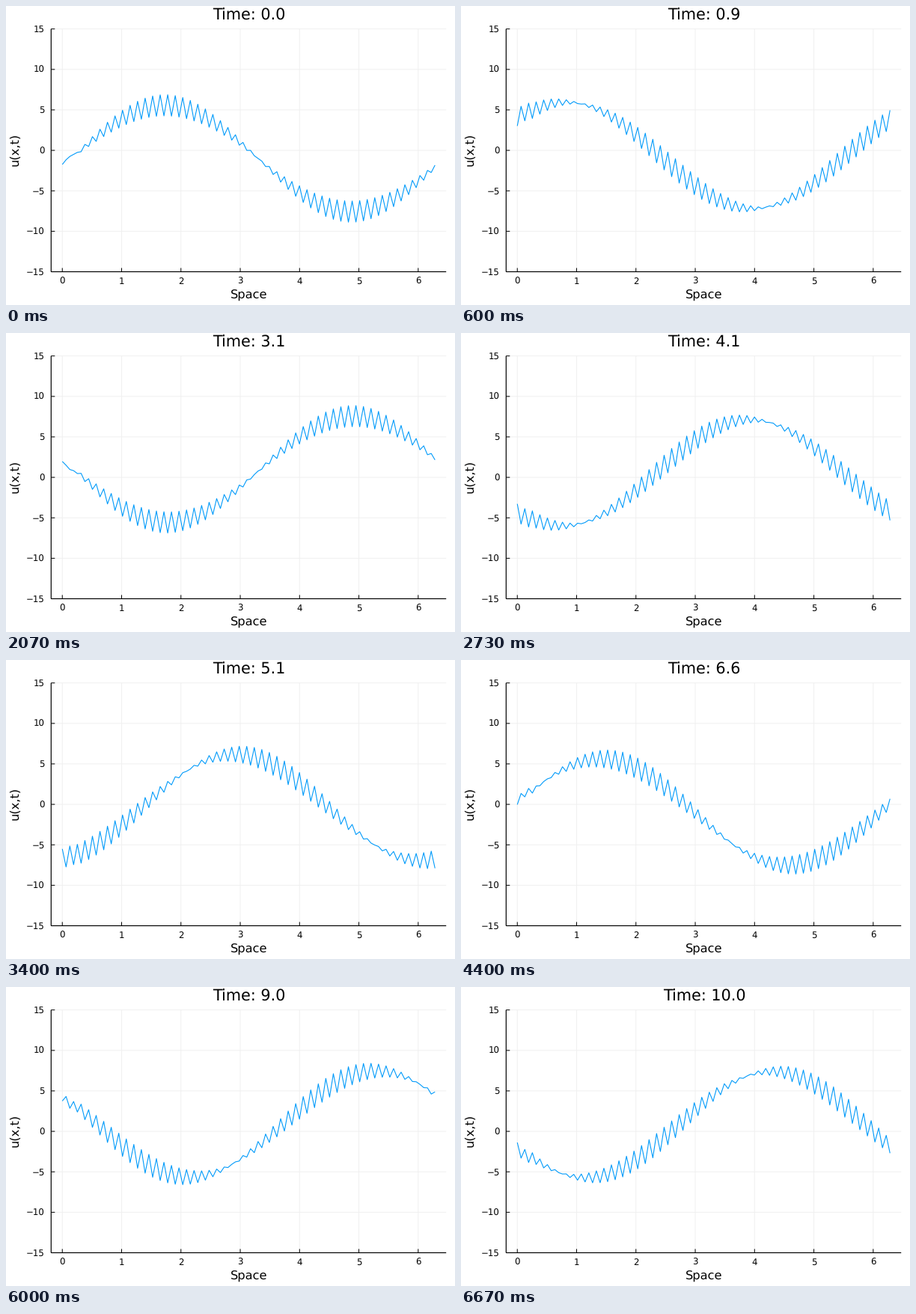
A matplotlib script for the animation above (6740 ms loop, 600 px wide and 400 px high).

```python
import numpy as np
import matplotlib.pyplot as plt
from matplotlib.animation import FuncAnimation

W, H, DPI = 600, 400, 100
LEFT, RIGHT, TOP, BOTTOM = 60.3, 588.2, 30.7, 355.5
TICK = 5
LOOP, STEP = 6740, 20      # ms
FPS, LAST = 15, 100        # simulation steps of 0.1 per second of playback
N = 100

plt.rcParams["font.family"] = "DejaVu Sans"
plt.rcParams["text.hinting"] = "no_hinting"
fig = plt.figure(figsize=(W / DPI, H / DPI), dpi=DPI, facecolor="white")
ax = fig.add_axes([0, 0, 1, 1])
ax.set(xlim=(0, W), ylim=(H, 0))
ax.axis("off")

span = 2 * np.pi
x_min, x_max = -0.03 * span, 1.03 * span


def px(x):
    return LEFT + (x - x_min) / (x_max - x_min) * (RIGHT - LEFT)


def py(y):
    return BOTTOM - (y + 15) / 30 * (BOTTOM - TOP)


def pt(pixels):
    return pixels * 72 / DPI


def line(xs, ys, color="black", width=1.0, z=2):
    return ax.plot(xs, ys, color=color, lw=pt(width), zorder=z, snap=False,
                   solid_capstyle="butt", solid_joinstyle="round")[0]


def label(x, y, text, size, ha="center", **kw):
    return ax.text(x, y, text, fontsize=pt(size), ha=ha, va="baseline", **kw)


GRID = "#f0f0f0"
for v in range(7):
    x = px(v)
    line([x, x], [TOP, BOTTOM], GRID, z=1)
    line([x, x], [BOTTOM, BOTTOM - TICK])
    label(x, 371.6, str(v), 11.8)
for v in range(-15, 16, 5):
    y = py(v)
    line([LEFT, RIGHT], [y, y], GRID, z=1)
    line([LEFT, LEFT + TICK], [y, y])
    label(52, y + 4.3, str(v).replace("-", "\u2212"), 11.8, ha="right")

line([LEFT, RIGHT], [BOTTOM, BOTTOM], width=1.2)
line([LEFT, LEFT], [TOP, BOTTOM], width=1.2)
label((LEFT + RIGHT) / 2, 391.8, "Space", 16.3)
label(16.6, (TOP + BOTTOM) / 2 - 1, "u(x,t)", 16.3,
      rotation=90, rotation_mode="anchor")
title = label((LEFT + RIGHT) / 2 + 1, 19.2, "", 20.8)

j = np.arange(N)
dx = span / (N - 1)
# the periodic grid holds one point too many, so the phase repeats once
phase = dx * (j - (j >= 4) - 1.5)
parity = 1 - 2 * (j % 2)
curve = line(px(j * dx), np.zeros(N), "#009afa", 1.1, z=3)


def solution(t):
    """Smooth wave moving left plus a grid-scale sawtooth moving right."""
    wave = 6.57 * np.sin(phase + t)
    saw = 1.31 * parity * np.sin(phase - t)
    return wave + saw - np.cos(t)


def update(k):
    # playback steps fall on times rounded to 10 ms
    step = min(LAST, int((k * STEP + 14) * FPS / 1000))
    t = step / 10
    curve.set_ydata(py(solution(t)))
    title.set_text(f"Time: {t:.1f}")
    return curve, title


anim = FuncAnimation(fig, update, frames=LOOP // STEP, interval=STEP,
                     init_func=lambda: update(0), repeat=True, repeat_delay=0)
plt.show()
```
